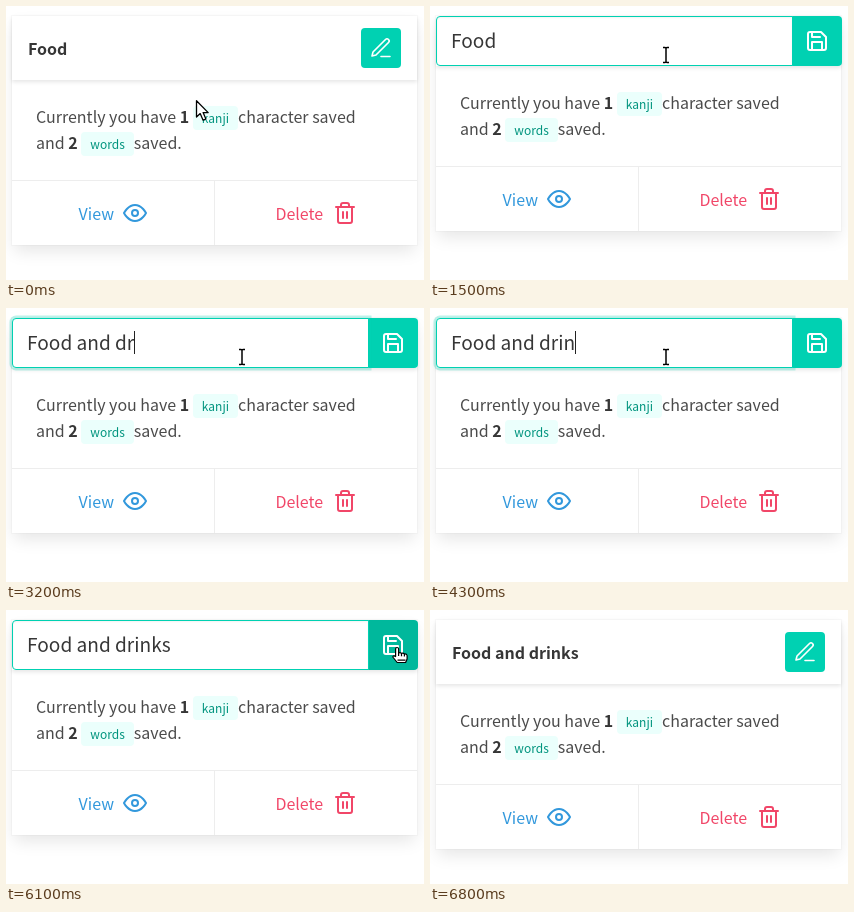
An HTML page for the animation above (7400 ms loop, 418 by 274 pixels).

```html
<!DOCTYPE html>
<html lang="en">
<head>
<meta charset="utf-8">
<title>Rename a card</title>
<style>
* { box-sizing: border-box; }
html, body { margin: 0; width: 100%; height: 100%; overflow: hidden; background: #fff; }
#stage {
  position: relative; width: 418px; height: 274px; overflow: hidden;
  font: 16px/24px "Noto Sans CJK JP", "Noto Sans CJK", "Noto Sans", sans-serif; color: #4a4a4a;
}
svg { display: block; overflow: visible; }
.icon {
  width: 24px; height: 24px; fill: none; stroke: currentColor;
  stroke-width: 2; stroke-linecap: round; stroke-linejoin: round;
}
.card {
  position: absolute; left: 6px; top: 10px; width: 405px;
  box-shadow: 0 8px 16px -2px rgba(10,10,10,.1), 0 0 0 1px rgba(10,10,10,.02);
}
.head { position: relative; height: 64px; box-shadow: 0 2px 4px rgba(10,10,10,.1); }
.editing .head { height: 50px; }
.editing .view, .card:not(.editing) .form { display: none; }
.title { position: absolute; left: 16px; top: 20px; font-weight: 700; color: #363636; white-space: pre; }
.button {
  position: absolute; display: flex; align-items: center; justify-content: center;
  background: #00d1b2; color: #fff;
}
.pressed .button { background: #00b89c; }
.edit { right: 16px; top: 12px; width: 40px; height: 40px; border-radius: 4px; }
.edit .icon { stroke-width: 1.6; }
.save { left: 356px; top: 0; width: 50px; height: 50px; border-radius: 0 4px 4px 0; }
.input {
  position: absolute; z-index: 1; left: 0; top: 0; width: 357px; height: 50px;
  padding: 8px 0 0 14px; border: 1px solid #00d1b2; border-radius: 4px 0 0 4px;
  background: #fff; box-shadow: inset 0 1px 2px rgba(10,10,10,.05);
  font-size: 19.1px; line-height: 30px; color: #363636; white-space: pre;
}
.focus .input { box-shadow: 0 0 0 2.5px rgba(0,209,178,.25); }
.caret { position: absolute; top: 12px; width: 1px; height: 23px; background: #222; }
.body { height: 100px; padding: 24px 24px 0; white-space: nowrap; }
.body b { color: #363636; }
.tag {
  display: inline-flex; align-items: center; height: 24px; padding: 0 9px; border-radius: 4px;
  font-size: 12px; line-height: 18px; background: #ebfffc; color: #00947e;
}
.foot { display: flex; height: 65px; border-top: 1px solid #ededed; }
.foot div { flex: 1; display: flex; align-items: center; justify-content: center; gap: 9.4px; color: #3298dc; }
.foot div:first-child { border-right: 1px solid #ededed; }
.foot div:last-child { color: #f14668; }
#pointer { position: absolute; z-index: 2; left: 0; top: 0; width: 1px; height: 1px; }
#pointer g { fill: #fff; stroke: #000; stroke-linejoin: round; }
</style>
</head>
<body>
<div id="stage">
  <div class="card" id="card">
    <div class="head">
      <div class="view">
        <div class="title" id="title"></div>
        <div class="button edit">
          <svg class="icon" viewBox="0 0 24 24"><path d="M12 20.5h9M16.5 3.5a2.12 2.12 0 0 1 3 3L7 19l-4 1 1-4z"/></svg>
        </div>
      </div>
      <div class="form">
        <div class="input"><span id="value"></span><i class="caret" id="caret"></i></div>
        <div class="button save">
          <svg class="icon" viewBox="0 0 24 24"><path d="M19 21H5a2 2 0 0 1-2-2V5a2 2 0 0 1 2-2h11l5 5v11a2 2 0 0 1-2 2zM17 21v-8H7v8M7 3v5h8"/></svg>
        </div>
      </div>
    </div>
    <div class="body">Currently you have <b>1</b> <span class="tag">kanji</span>character saved<br>and <b>2</b> <span class="tag">words</span>saved.</div>
    <div class="foot">
      <div>View
        <svg class="icon" viewBox="0 0 24 24"><path d="M1 12s4-8 11-8 11 8 11 8-4 8-11 8-11-8-11-8z"/><circle cx="12" cy="12" r="3"/></svg>
      </div>
      <div>Delete
        <svg class="icon" viewBox="0 0 24 24"><path d="M3 6h18M19 6v14a2 2 0 0 1-2 2H7a2 2 0 0 1-2-2V6m3 0V4a2 2 0 0 1 2-2h4a2 2 0 0 1 2 2v2M10 11v6M14 11v6"/></svg>
      </div>
    </div>
  </div>
  <svg id="pointer">
    <g id="arrow" stroke-width="1.3"><path d="M.5 .8V17l3.7-3.4 2.9 6.6 2.8-1.2-2.8-6.4h5.1z"/></g>
    <g id="hand" stroke-width="1.2">
      <path d="M-1.4 9.5V2a1.5 1.5 0 0 1 3 0v4q1.6-1 2.9.4 1.7-.8 2.9.5 2.3-.3 2.7 1.6V12l-1.5 3.5H.2L-4.2 10q.5-2 2.8-.5z"/>
      <path d="M1.6 6v3M4.5 6.4v2.8M7.4 6.9v2.5M.5 13.2h8" fill="none"/>
    </g>
    <g id="beam" fill="none">
      <path id="bar" d="M-3-7.5h2q1 0 1 1 0-1 1-1h2M0-6.5v13M-3 7.5h2q1 0 1-1 0 1 1 1h2" style="stroke:#fff;stroke-width:3.4;fill:none"/>
      <use href="#bar" style="display:none"/>
      <path d="M-3-7.5h2q1 0 1 1 0-1 1-1h2M0-6.5v13M-3 7.5h2q1 0 1-1 0 1 1 1h2" style="stroke-width:1.5;fill:none"/>
    </g>
  </svg>
</div>
<script>
const LOOP = 7400, STEP = 100, BLINK = 600;
const OPEN = 1100, FOCUS = 1600, PRESS = 6100, CLOSE = 6200, GONE = 6800;
const NAME = "Food and drinks";
const KEYS = [2200, 2300, 2500, 2700, 2800, 3000, 3200, 4100, 4300, 4400, 4500];
// Pointer trips: first step, last step, from, to
const TRIPS = [
  [300, 800, [190, 94], [371, 42]],
  [1200, 1500, [371, 42], [236, 48.5]],
  [5200, 5800, [236, 48.5], [391, 36.5]],
  [6400, 6700, [391, 36.5], [72, 0]]
];

const $ = id => document.getElementById(id);
const ease = p => p * p * (3 - 2 * p);
const show = (el, on) => { el.style.display = on ? "" : "none"; };

function pointerAt(t) {
  const [start, end, a, b] = TRIPS.filter(trip => trip[0] <= t).pop() || TRIPS[0];
  const p = ease(Math.min(1, Math.max(0, (t - start + STEP) / (end - start + STEP))));
  return a.map((v, i) => v + (b[i] - v) * p);
}

function shapeAt(x, y, editing) {
  if (editing) return x >= 362 ? "hand" : "beam";
  return x >= 355 && x < 395 && y >= 22 && y < 62 ? "hand" : "arrow";
}

function render(t) {
  const editing = t >= OPEN && t < CLOSE;
  const focused = t >= FOCUS && t < PRESS;
  const typed = KEYS.filter(k => k <= t);
  const lastKey = typed.length ? typed[typed.length - 1] : FOCUS;

  const card = $("card").classList;
  card.toggle("editing", editing);
  card.toggle("focus", focused);
  card.toggle("pressed", (t >= OPEN - STEP && t < OPEN) || (t >= PRESS && t < CLOSE));

  $("title").textContent = t < CLOSE ? "Food" : NAME;
  $("value").textContent = NAME.slice(0, 4 + typed.length);
  show($("caret"), focused && Math.floor((t - lastKey) / BLINK) % 2 === 0);

  const [x, y] = pointerAt(t);
  const shape = shapeAt(x, y, editing);
  for (const id of ["arrow", "hand", "beam"]) show($(id), id === shape && t < GONE);
  $("pointer").style.transform = `translate(${Math.round(x)}px, ${Math.round(y)}px)`;
}

let shown = -1;
function tick() {
  const t = Math.floor(performance.now() % LOOP / STEP) * STEP;
  if (t !== shown) render(shown = t);
  requestAnimationFrame(tick);
}
tick();
</script>
</body>
</html>
```
